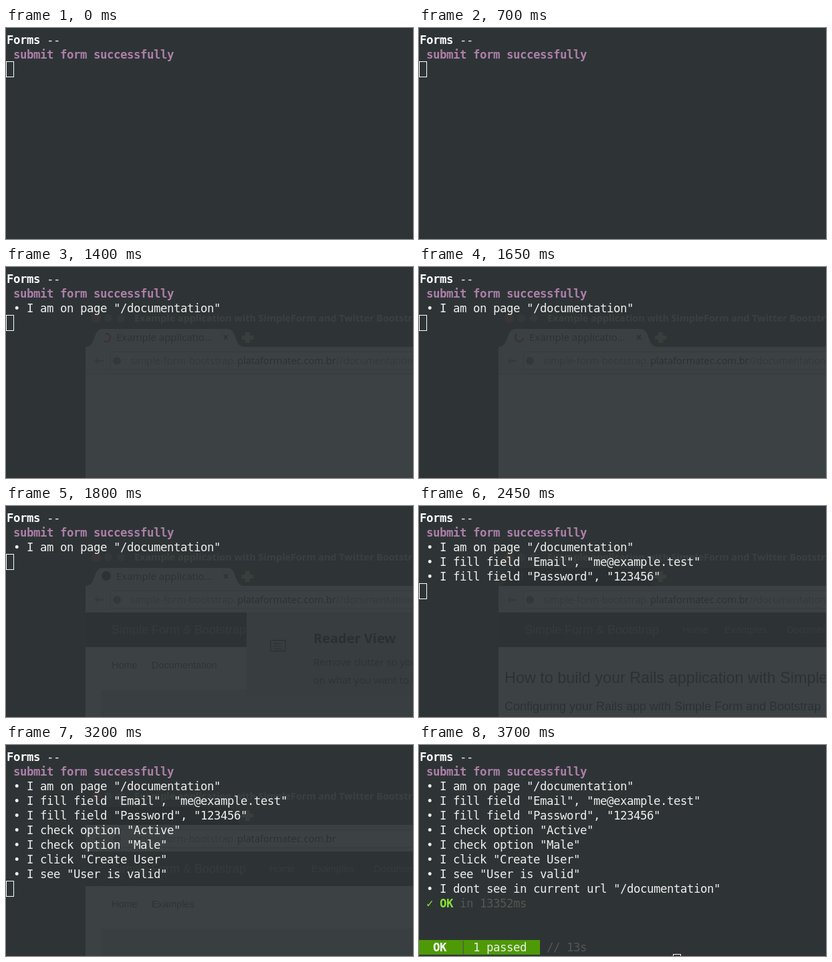
Recreate the animation shown at these times as an HTML page with a canvas. Size 609 by 317 pixels, loop 4.9 s.

```html
<!DOCTYPE html>
<html lang="en">
<head>
<meta charset="utf-8">
<title>Terminal test run</title>
<style>
  html, body { margin: 0; width: 100%; height: 100%; overflow: hidden; background: #2e3436; }
  canvas { position: absolute; left: 0; top: 0; }
</style>
</head>
<body>
<canvas id="browser" width="609" height="317"></canvas>
<canvas id="terminal" width="609" height="317"></canvas>
<script>
const LOOP = 4900, COL = 10, ROW = 22;
const MONO = '17.33px "DejaVu Sans Mono", monospace';
const UI = '"Open Sans", sans-serif', PAGE = '"Liberation Sans", sans-serif';
const WHITE = '#eeeeec', GREY = '#555753', LIME = '#8ae234';
const TITLE = 'Example application with SimpleForm and Twitter Bootstrap';

const steps = [
  [950, 'I am on page "/documentation"'],
  [2100, 'I fill field "Email", "me@example.test"'],
  [2300, 'I fill field "Password", "123456"'],
  [2500, 'I check option "Active"'],
  [2650, 'I check option "Male"'],
  [2800, 'I click "Create User"'],
  [3150, 'I see "User is valid"'],
  [3600, 'I dont see in current url "/documentation"']
];

const browser = document.getElementById('browser');
const b = browser.getContext('2d');
const term = document.getElementById('terminal').getContext('2d');

function text(ctx, str, x, y, font, color) {
  ctx.font = font;
  ctx.fillStyle = color;
  ctx.fillText(str, x, y);
}

function rect(ctx, x, y, w, h, color) {
  ctx.fillStyle = color;
  ctx.fillRect(x, y, w, h);
}

function circle(x, y, r, color) {
  b.fillStyle = color;
  b.beginPath();
  b.arc(x, y, r, 0, 7);
  b.fill();
}

// One character per terminal cell
function put(str, col, row, color, bold) {
  const font = (bold ? 'bold ' : '') + MONO;
  [...str].forEach((ch, i) => text(term, ch, 1 + COL * (col + i), 24 + ROW * row, font, color));
}

function drawTerminal(t) {
  term.clearRect(0, 0, 609, 317);
  put('Forms', 0, 0, '#fff', true);
  put('--', 6, 0, WHITE);
  put('submit form successfully', 1, 1, '#ad7fa8', true);
  const shown = steps.filter(([at]) => t >= at);
  shown.forEach(([, line], i) => put('• ' + line, 1, i + 2, WHITE));

  let col = 0, row = shown.length + 2;
  if (t >= 3650) {
    put('✓', 1, 10, LIME);
    put('OK', 3, 10, LIME, true);
    put('in 13352ms', 6, 10, GREY);
    row = 11;
  }
  if (t >= 3700) {
    rect(term, 0, 293, 181, ROW, '#4e9a06');
    put('OK', 2, 13, '#fff', true);
    put('│', 6, 13, GREY);
    put('1 passed', 8, 13, WHITE);
    put('// 13s', 19, 13, GREY);
    col = 38;
    row = 14;
  }
  term.strokeStyle = '#fff';
  term.strokeRect(COL * col + 0.5, 6 + ROW * row + 0.5, 11, 23);
}

function drawTab(t, loaded) {
  b.fillStyle = t < 2100 ? '#f2f1f0' : '#000';
  b.beginPath();
  b.moveTo(119, 120);
  b.bezierCurveTo(136, 120, 129, 93, 145, 93);
  b.lineTo(331, 93);
  b.bezierCurveTo(347, 93, 340, 120, 357, 120);
  b.fill();
  if (t < 1800) {
    const turn = t / 130;
    b.strokeStyle = loaded ? '#c43' : '#555';
    b.lineWidth = 3;
    b.beginPath();
    b.arc(150, 106, 6, turn, turn + 4);
    b.stroke();
  } else {
    circle(150, 105, 7, '#222');
  }
  text(b, loaded ? 'Example applicatio…' : 'Connecting…', 165, 111, '15px ' + UI, '#111');
  text(b, '×', 324, 112, 'bold 17px ' + UI, '#222');
  rect(b, 353, 103, 17, 6, '#cc9');
  rect(b, 358, 98, 7, 16, '#cc9');
}

function drawToolbar(t, loaded) {
  const font = '14.6px ' + UI;
  rect(b, 119, 120, 490, 40, '#f0efee');
  rect(b, 156, 127, 453, 27, '#fff');
  b.strokeStyle = '#aaa';
  b.lineWidth = 1;
  b.strokeRect(156.5, 127.5, 470, 26);
  text(b, '←', 132, 147, 'bold 18px "DejaVu Sans", sans-serif', '#888');
  circle(166, 141, 6, '#777');
  if (!loaded) {
    text(b, 'Search or enter address', 186, 146, '14.25px ' + UI, '#777');
    return;
  }
  text(b, 'simple-form-bootstrap.', 186, 146, font, '#777');
  text(b, 'plataformatec.com.br', 346, 146, font, '#000');
  if (t < 3000) text(b, '//documentation', 494, 146, font, '#777');
}

function drawReaderPopup() {
  rect(b, 360, 160, 249, 125, '#bdbcba');
  b.strokeStyle = '#444';
  b.lineWidth = 2;
  b.strokeRect(396, 202, 22, 16);
  for (const y of [206, 210, 214]) rect(b, 400, y, 12, 1.5, '#444');
  text(b, 'Reader View', 460, 206, 'bold 20px ' + UI, '#000');
  text(b, 'Remove clutter so you can focus', 460, 240, '15px ' + UI, '#222');
  text(b, 'on what you want to read', 460, 267, '15px ' + UI, '#222');
}

function drawPage(t) {
  const nav = '14.5px ' + PAGE;
  rect(b, 119, 160, 490, 52, '#222');
  text(b, 'Simple Form & Bootstrap', 158, 192, '18px ' + PAGE, '#999');
  if (t >= 2100) {
    text(b, 'Home', 394, 191, nav, '#999');
    text(b, 'Examples', 457, 191, nav, '#999');
    text(b, 'Documentation', 550, 191, nav, '#999');
  }
  if (t >= 2100 && t < 3000) {
    text(b, 'How to build your Rails application with Simple Form', 128, 266, '23.4px ' + PAGE, '#111');
    text(b, 'Configuring your Rails app with Simple Form and Bootstrap', 128, 307, '18px ' + PAGE, '#111');
    return;
  }
  text(b, 'Home', 158, 244, nav, '#333');
  text(b, t < 2100 ? 'Documentation' : 'Examples', 218, 244, nav, '#333');
  rect(b, 142, 276, 467, 41, '#d4dcda');
  if (t < 2100) drawReaderPopup();
}

function drawBrowser(t) {
  const fadeIn = Math.min(1, Math.max(0, (t - 700) / 200));
  const fadeOut = Math.min(1, Math.max(0, (3700 - t) / 100));
  browser.style.opacity = 0.065 * fadeIn * fadeOut;
  b.clearRect(0, 0, 609, 317);
  const loaded = t >= 1250;
  rect(b, 119, 64, 490, 56, '#3c3b37');
  circle(135, 77, 7, '#e0562b');
  circle(153, 77, 6, '#777');
  circle(172, 77, 6, '#777');
  text(b, loaded ? TITLE : 'Tavello Skyhare', 192, 82, 'bold 14.4px ' + UI, '#dfdbd2');
  rect(b, 119, 160, 490, 157, '#fff');
  drawTab(t, loaded);
  drawToolbar(t, loaded);
  rect(b, 119, 160, 490, 1, '#999');
  if (t >= 1800) drawPage(t);
}

function frame(now) {
  const t = now % LOOP;
  drawBrowser(t);
  drawTerminal(t);
  requestAnimationFrame(frame);
}
requestAnimationFrame(frame);
</script>
</body>
</html>
```
